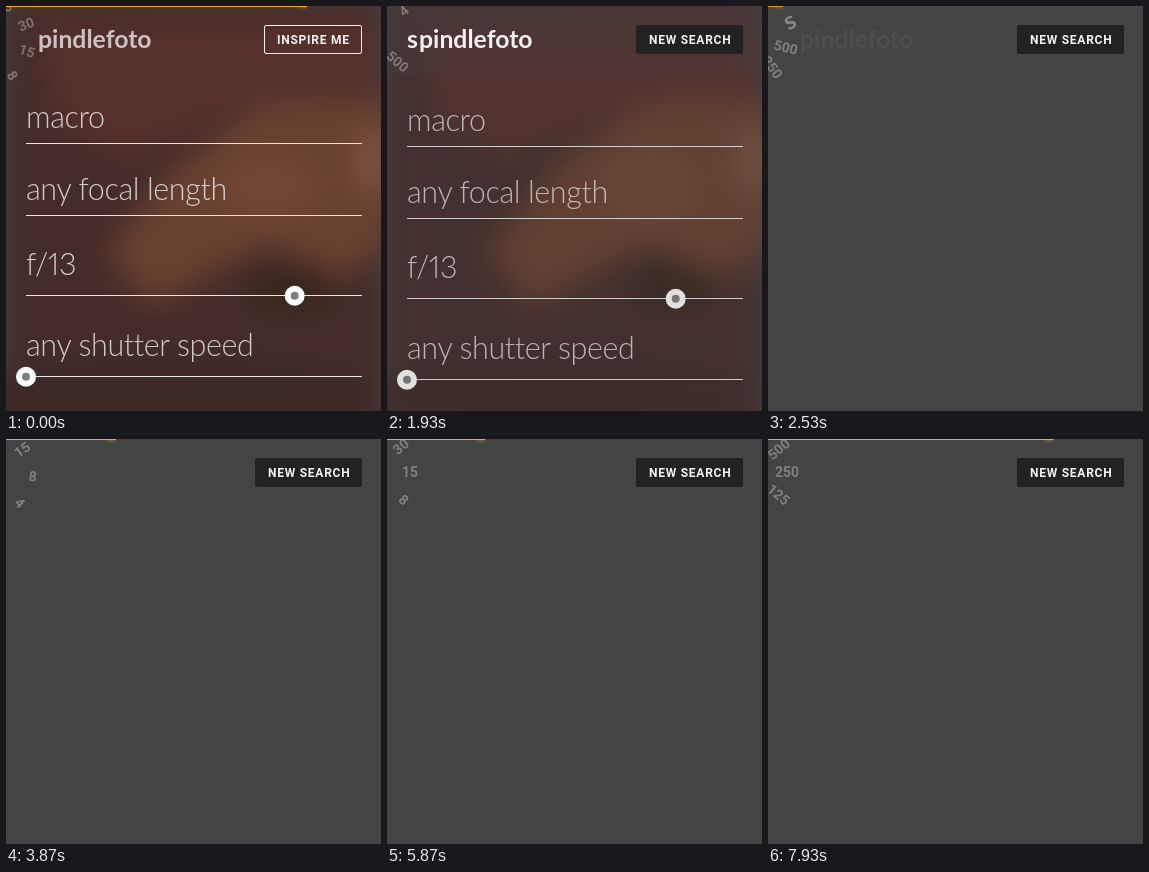
These frames come from a looping animation (375 by 405 pixels, 8000 ms). An HTML page:

```html
<!DOCTYPE html>
<html lang="en">
<head>
<meta charset="utf-8">
<title>Shutter search</title>
<style>
  html, body { margin: 0; width: 100%; height: 100%; overflow: hidden; background: #444; }
  svg { display: block; width: 375px; height: 405px; }
  text { fill: #f4f2f1; }
  .field { font: 300 30.5px Lato, sans-serif; letter-spacing: -.4px; font-variant-numeric: proportional-nums; fill-opacity: .8; }
  .logo { font: 700 24.8px Lato, sans-serif; }
  .label { font: 700 12px Roboto, sans-serif; letter-spacing: .75px; }
  .number { font: 600 14px Roboto, sans-serif; }
</style>
</head>
<body>
<svg viewBox="0 0 375 405">
  <defs>
    <filter id="soft" filterUnits="userSpaceOnUse" x="-60" y="-60" width="500" height="530" color-interpolation-filters="sRGB">
      <feGaussianBlur stdDeviation="14"/>
    </filter>
    <filter id="glow" x="-100%" y="-100%" width="300%" height="300%" color-interpolation-filters="sRGB">
      <feGaussianBlur stdDeviation="1.5"/>
    </filter>
  </defs>
  <rect width="375" height="405" fill="#444"/>
  <g id="photo" filter="url(#soft)">
    <rect x="-3" y="-8" width="382" height="440" fill="#452c2a"/>
    <path d="M30 20L375 15V85L230 105L120 150L50 110Z" fill="#56302d"/>
    <path d="M385 90L255 98L170 160L100 245L145 300L215 262L265 240L335 275L385 235Z" fill="#68402f"/>
    <ellipse cx="262" cy="180" rx="52" ry="36" fill="#704634"/>
    <ellipse cx="366" cy="155" rx="20" ry="34" fill="#7d5240"/>
    <ellipse cx="286" cy="282" rx="46" ry="24" fill="#39261f"/>
    <ellipse cx="165" cy="395" rx="210" ry="45" fill="#3d2926"/>
  </g>
  <rect id="strip" width="375" height="68" fill="#444"/>
  <g id="form"></g>
  <g id="dial"></g>
  <text id="title" class="logo" x="32" y="42">pindlefoto</text>
  <g id="inspire">
    <rect x="258.5" y="19.5" width="97" height="28" rx="1.5" fill="none" stroke="#f4f2f1"/>
    <text class="label" x="271" y="38">INSPIRE ME</text>
  </g>
  <g id="search">
    <rect x="249" y="19" width="107" height="29" rx="2" fill="#222"/>
    <text class="label" x="262" y="38">NEW SEARCH</text>
  </g>
  <g id="progress" fill="#ffa50f">
    <rect id="bar" height="1"/>
    <ellipse id="peg" rx="5" ry="2.5" opacity=".35" filter="url(#glow)"/>
  </g>
</svg>
<script>
const LOOP = 8000, STEP = 40, RADIUS = 47.4;
const $ = id => document.getElementById(id);
const clamp = v => Math.min(1, Math.max(0, v));
const ramp = (t, start, end) => clamp((t - start) / (end - start));
const ease = u => (1 - Math.cos(Math.PI * u)) / 2;

function add(parent, tag, attrs, text = '') {
  const el = document.createElementNS('http://www.w3.org/2000/svg', tag);
  for (const key in attrs) el.setAttribute(key, attrs[key]);
  el.textContent = text;
  return parent.appendChild(el);
}

// label, text baseline, rule position, slider position
const fields = [
  ['macro', 121.5, 137],
  ['any focal length', 193.5, 209],
  ['f/13', 268.5, 289, 288.7],
  ['any shutter speed', 349.5, 370, 20]
];
for (const [label, baseline, rule, knob] of fields) {
  add($('form'), 'text', { class: 'field', x: 20, y: baseline }, label);
  add($('form'), 'rect', { x: 20, y: rule, width: 336, height: 1, fill: '#fff', opacity: .88 });
  if (knob) {
    add($('form'), 'circle', { cx: knob, cy: rule + .8, r: 10, fill: '#fff' });
    add($('form'), 'circle', { cx: knob, cy: rule + .8, r: 4, fill: '#808080' });
  }
}

// The first dial entry doubles as the initial of the title.
const marks = ['s', 500, 250, 125, 60, 30, 15, 8, 4].map((mark, i) => add($('dial'), 'text', {
  class: i ? 'number' : 'logo', x: RADIUS, y: i ? 5 : 9, 'text-anchor': 'end', opacity: .34
}, mark));

// start, turning point, end, then the dial position at each
const spins = [
  [50, 500, 720, 5.55, -.4, 0],
  [2230, 3770, 4070, 0, 7.15, 6],
  [6380, 7560, 7880, 6, 1.3, 2]
];
function dialAt(t) {
  const [start, turn, end, from, over, to] = spins.filter((s, i) => !i || t >= s[0]).pop();
  return from + (over - from) * ease(ramp(t, start, turn)) + (to - over) * ease(ramp(t, turn, end));
}

const barKeys = [[0, 301], [70, 301], [300, 375], [2299, 375], [2300, 0], [2530, 15], [3600, 98],
  [3870, 110], [4070, 115], [4270, 115], [4530, 19], [4670, 19], [5470, 70], [5870, 98],
  [6330, 113], [6400, 116], [7200, 268], [7930, 285.5], [LOOP, 286]];
function barAt(t) {
  const i = barKeys.findIndex(key => key[0] > t);
  const [t0, x0] = barKeys[i - 1], [t1, x1] = barKeys[i];
  return x0 + (x1 - x0) * (t - t0) / (t1 - t0);
}

function draw(t) {
  const leave = ramp(t, 1900, 2110);
  const titleAlpha = t < 2200 ? .75 + .25 * ramp(t, 70, 250) : 1 - ramp(t, 2200, 2550);
  const position = dialAt(t), x = barAt(t);

  $('photo').setAttribute('opacity', (1 - leave) ** 1.3);
  $('strip').setAttribute('opacity', clamp(leave * 1.4));
  $('form').setAttribute('opacity', 1 - leave);
  $('form').setAttribute('transform', `translate(0 ${20 * leave})`);
  $('title').setAttribute('opacity', titleAlpha);
  $('inspire').style.display = t < 1930 ? '' : 'none';
  $('search').style.display = t < 1930 ? 'none' : '';

  marks.forEach((mark, i) => mark.setAttribute('transform', `rotate(${(i - position) * STEP})`));
  marks[0].setAttribute('opacity', .34 + .66 * titleAlpha);

  $('bar').setAttribute('width', x);
  $('peg').setAttribute('cx', x - 5);
  $('progress').setAttribute('opacity', t < 2300 ? 1 - ramp(t, 300, 600) : ramp(t, 2250, 2600));
}

$('dial').setAttribute('transform', 'translate(-16.4 32.8)');
const origin = performance.now();
function tick() {
  draw((performance.now() - origin) % LOOP);
  requestAnimationFrame(tick);
}
tick();
</script>
</body>
</html>
```
